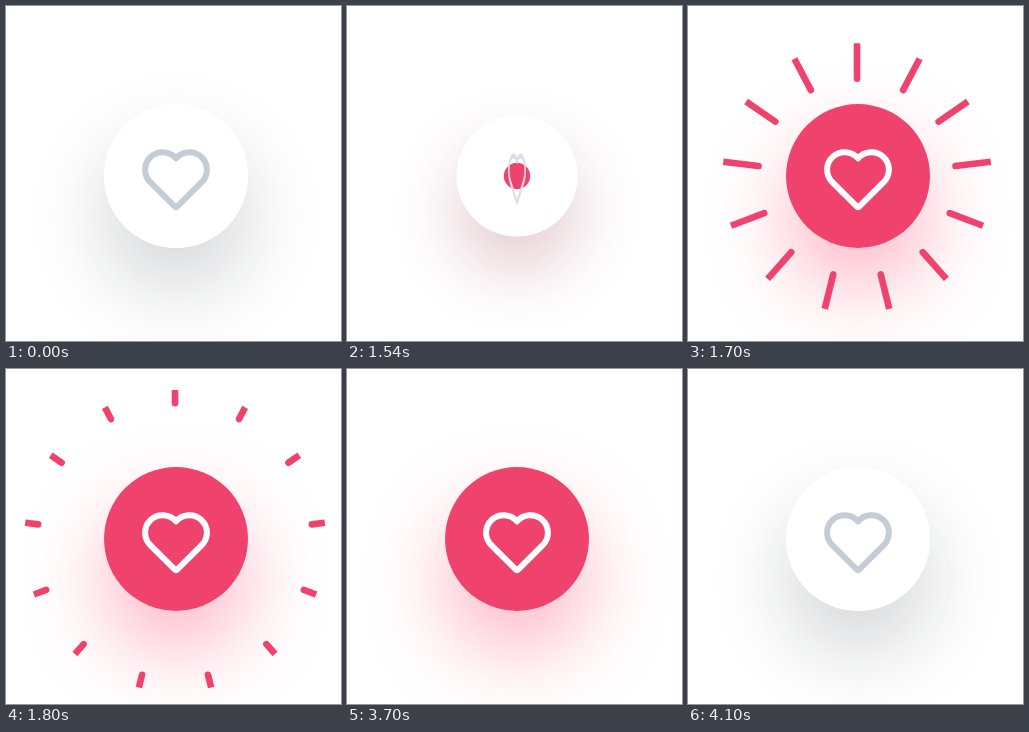
An HTML page with a canvas for the animation above (4.8 s loop, 335 px wide and 335 px high).

```html
<!DOCTYPE html>
<html lang="en">
<head>
<meta charset="utf-8">
<title>Like button</title>
<style>
  html, body { margin: 0; width: 100%; height: 100%; overflow: hidden; background: #fff; }
  canvas { display: block; width: 335px; height: 335px; }
</style>
</head>
<body>
<canvas id="stage" width="335" height="335"></canvas>
<script>
const ctx = document.getElementById('stage').getContext('2d');

const LOOP = 4800;
const C = 170, R = 72;
const PINK = [239, 67, 109, 1], WHITE = [255, 255, 255, 1], GRAY = [197, 204, 214, 1];
const SHADE = [18, 22, 33, 0.18], GLOW = [255, 60, 100, 0.37];

const progress = (t, from, to) => Math.min(1, Math.max(0, (t - from) / (to - from)));
const smooth = p => p * p * (3 - 2 * p);
const easeOut = (p, n) => 1 - Math.pow(1 - p, n);

function mix(a, b, p) {
  const alpha = a[3] + (b[3] - a[3]) * p;
  const rgb = [0, 1, 2].map(i => Math.round((a[i] * a[3] * (1 - p) + b[i] * b[3] * p) / alpha));
  return `rgba(${rgb.join(',')},${alpha})`;
}

function disc(radius, fill) {
  ctx.beginPath();
  ctx.arc(0, 0, radius, 0, Math.PI * 2);
  ctx.fillStyle = fill;
  ctx.fill();
}

const heart = new Path2D(
  'M0 -17.6 A17.5 17.5 0 1 0 -25.9 5.9 L-1.6 30.2 Q0 31.8 1.6 30.2 L25.9 5.9 A17.5 17.5 0 1 0 0 -17.6 Z'
);

function drawRays(t) {
  const u = progress(t, 1560, 1920);
  if (u === 0 || u === 1) return;
  const start = 68.5, span = 85.5, half = 3.3;
  const outer = start + span * easeOut(u, 3);
  const inner = start + span * easeOut(progress(u, 0.24, 1), 2);
  if (outer <= inner) return;

  ctx.save();
  ctx.translate(169, 172);
  ctx.fillStyle = mix(PINK, PINK, 0);
  for (let i = 0; i < 13; i++) {
    ctx.save();
    ctx.rotate(i * Math.PI * 2 / 13);
    ctx.beginPath();
    ctx.moveTo(half, -outer);
    ctx.lineTo(half, -inner);
    ctx.arc(0, -inner, half, 0, Math.PI);
    ctx.lineTo(-half, -outer);
    ctx.fill();
    ctx.restore();
  }
  ctx.restore();
}

function draw(t) {
  const press = progress(t, 1300, 1700);
  const reset = smooth(progress(t, 3700, 4100));
  const liked = press * press * (1 - reset);
  const scale = 1 - 0.17 * Math.sin(Math.PI * press);
  const spread = Math.pow(progress(press, 0.4, 1), 1.4);

  ctx.clearRect(0, 0, 335, 335);

  // Cast the shadow from an opaque disc so its own alpha stays exact.
  ctx.save();
  ctx.translate(C, C);
  ctx.scale(scale, scale);
  ctx.shadowColor = mix(SHADE, GLOW, liked);
  ctx.shadowBlur = 80 * scale;
  ctx.shadowOffsetY = 40 * scale;
  disc(R, '#fff');
  ctx.restore();

  drawRays(t);

  ctx.save();
  ctx.translate(C, C);
  ctx.scale(scale, scale);
  disc(R, '#fff');
  if (spread > 0 && reset < 1) disc(R * spread, mix(PINK, WHITE, reset));

  // The heart makes half a turn about its vertical axis.
  ctx.scale(Math.cos(Math.PI * press) || 0.001, 1);
  ctx.lineWidth = 6;
  ctx.lineJoin = 'round';
  ctx.strokeStyle = mix(GRAY, WHITE, liked);
  ctx.stroke(heart);
  ctx.restore();
}

function tick() {
  draw(performance.now() % LOOP);
  requestAnimationFrame(tick);
}
tick();
</script>
</body>
</html>
```
